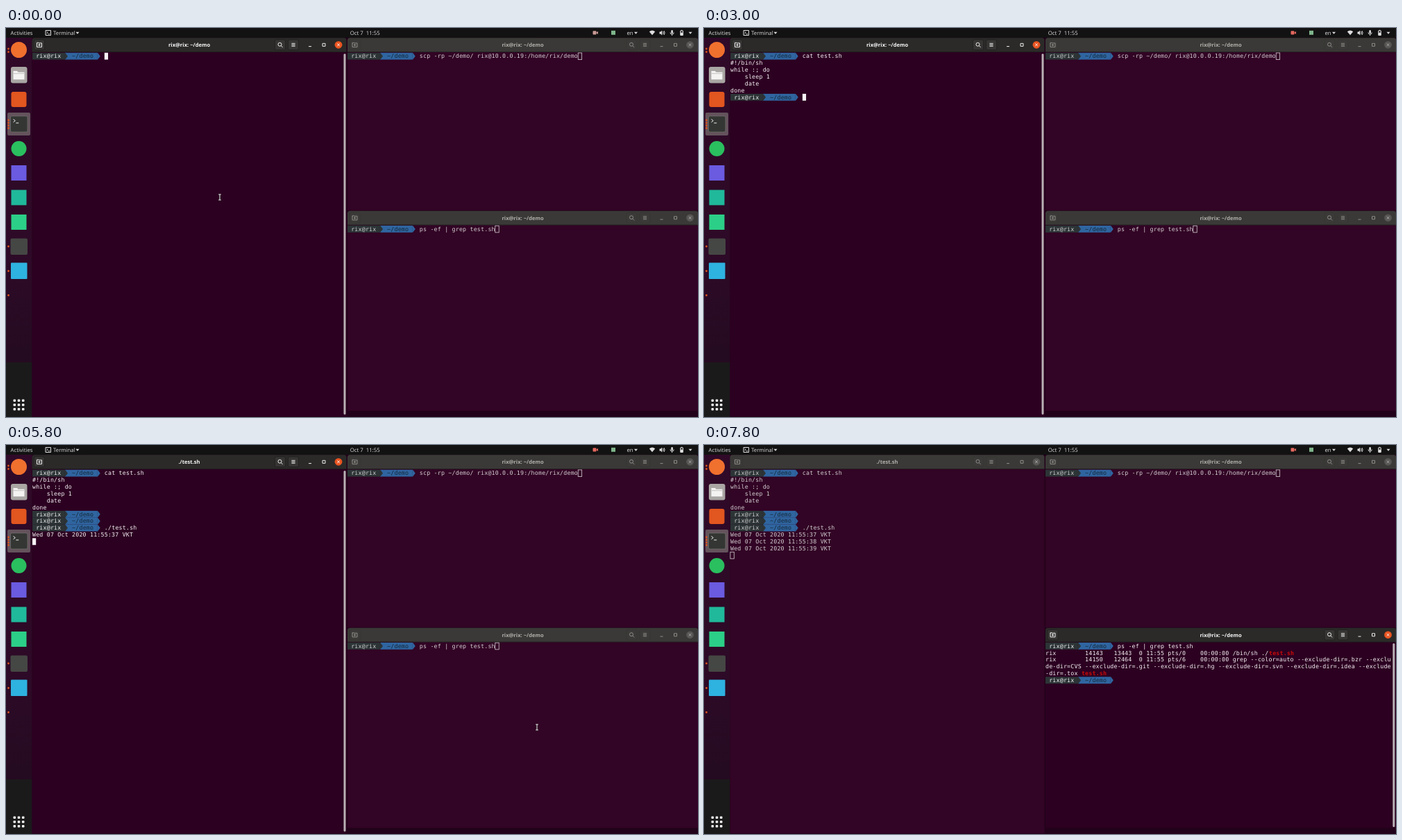
Animation, 997 px wide and 561 px high, one loop 8000 ms. Source, as an HTML page:

```html
<!DOCTYPE html>
<html lang="en">
<head>
<meta charset="utf-8">
<title>Terminal demo</title>
<style>
  html, body { margin: 0; height: 100%; overflow: hidden; background: #111; }
  svg { display: block; width: 100vw; height: 100vh; }
  text { white-space: pre; text-rendering: geometricPrecision; }
  .mono { font: 8.31px "DejaVu Sans Mono", monospace; letter-spacing: .19px; }
  .red { font-weight: bold; }
  .ui { font: 7.8px "Open Sans", "Noto Sans", sans-serif; fill: #dedede; }
  .title { font: bold 7.6px "Open Sans", "Noto Sans", sans-serif; text-anchor: middle; }
  .line { fill: none; stroke-width: 1; }
</style>
</head>
<body>
<svg viewBox="0 0 997 561" preserveAspectRatio="none">
  <defs>
    <linearGradient id="dockFill" x2="0" y2="1">
      <stop offset="0" stop-color="#300a28"/>
      <stop offset=".6" stop-color="#2d0a27"/>
      <stop offset=".855" stop-color="#240b21"/>
      <stop offset=".857" stop-color="#1a1a1a"/>
    </linearGradient>
  </defs>
  <g id="shell"></g>
  <g id="windows"></g>
</svg>
<script>
const LOOP = 8000, CELL = 5.193, ROW = 9.866;
const USER = 'rix', HOST = `${USER}@${USER}`, HOME_TITLE = `${HOST}: ~/demo`;
const LEFT = { x: 37.5, y: 14, right: 490.5, bottom: 560, col: 38, top: 35.7 };
const UPPER = { x: 492, y: 14, right: 997, bottom: 263, col: 492, top: 35.7 };
const LOWER = { x: 492, y: 263.5, right: 997, bottom: 552, col: 492, top: 285 };

const box = (x, y, w, h, fill, r = 0, more = '') =>
  `<rect x="${x}" y="${y}" width="${w}" height="${h}" rx="${r}" fill="${fill}" ${more}/>`;
const dot = (x, y, r, fill) => `<circle cx="${x}" cy="${y}" r="${r}" fill="${fill}"/>`;
const shape = (d, fill) => `<path d="${d}" fill="${fill}"/>`;
const line = (d, stroke, w = 1) => `<path class="line" d="${d}" stroke="${stroke}" stroke-width="${w}"/>`;
const label = (x, y, s, cls = 'ui', more = '') => `<text x="${x}" y="${y}" class="${cls}" ${more}>${s}</text>`;
const caret = x => shape(`M${x - 2.5} 5.8h5l-2.5 3z`, '#dedede');

// Blend two [r, g, b] colours
const mix = (a, b, k) => `rgb(${a.map((v, i) => Math.round(v + (b[i] - v) * k))})`;

function topBar() {
  const ink = '#dedede';
  return box(0, 0, 997, 14, '#121212') +
    label(6.5, 9.7, 'Activities') +
    line('M57 3.5h7.5v7H57zM58.7 5.3l1.5 1.4-1.5 1.4M61 8.7h2', ink, .8) +
    label(68, 9.7, 'Terminal') + caret(103) +
    label(517.2, 9.7, 'Oct 7&#8194;11:55', 'ui', 'text-anchor="middle"') +
    box(872, 3.8, 6, 6, '#7fb58b') +
    label(894.5, 9.7, 'en') + caret(907.5) +
    shape('M926.8 5.3q4.2-3.4 8.4 0l-4.2 5z', ink) +
    shape('M941.5 5.5h1.7l2-2v7l-2-2h-1.7z', ink) + line('M946.5 5q1.5 2 0 4M948 4q2.3 3 0 6', ink, .7) +
    box(958.3, 3, 2.6, 5, ink, 1.3) + line('M957 6.5q0 2.6 2.6 2.6t2.6-2.6M959.6 9v2', ink, .7) +
    line('M971.7 4h3.6v6.5h-3.6z', ink, .8) + box(972.6, 2.8, 1.8, 1, ink) + box(972, 6.5, 3, 4, ink) +
    caret(986);
}

function dock() {
  let s = box(0, 14, 37.5, 547, 'url(#dockFill)');
  s += box(2, 122, 33, 33, '#64525c', 2);
  s += dot(18.5, 31.5, 11.5, '#f0702e');
  s += box(7, 56, 23.5, 23.5, '#a9a6a4', 3) +
    shape('M10.5 62h5.5l1.5 1.7h9v10.5h-16z', '#f4f3f2') + line('M11 65.7h15', '#c4c2c0', .7);
  s += box(7.5, 92, 22, 22, '#e2561f', 3);
  s += box(6.5, 127, 24.5, 23, '#343634', 2, 'stroke="#6f6f6b" stroke-width=".8"') +
    line('M10.5 131.5l2.8 2.2-2.8 2.2M14.3 137h4', '#eee', 1);
  s += dot(18.5, 174, 11, '#2abf5f');
  s += box(7.5, 198, 22, 22, '#6a5be0');
  s += box(7.5, 233.5, 22, 22, '#20b99b');
  s += box(7.5, 269, 22, 22, '#2ccf87');
  s += box(6.5, 303.5, 24.5, 23.5, '#454744', 2);
  s += box(7, 338.5, 23.5, 23.5, '#2eb2e0', 1);
  for (let i = 0; i < 9; i++) s += box(10.5 + i % 3 * 6.2, 535.5 + Math.floor(i / 3) * 6.2, 3.6, 3.6, '#eeeeee', 1);
  for (const y of [30, 34.5, 133, 136.8, 140.6, 144.4, 315, 350.5, 385.5]) s += dot(3.5, y, 1.4, '#d9531e');
  return s;
}

// Window frame; k is the focus amount, 0 to 1
function frame(win, title, k) {
  const { x, y, right, bottom } = win, mid = y + 10.3, w = right - x;
  const ink = mix([142, 140, 136], [240, 240, 240], k);
  const titleInk = mix([176, 174, 170], [245, 245, 245], k);
  const head = mix([58, 57, 55], [43, 42, 41], k);
  const body = mix([50, 4, 37], [44, 0, 33], k);
  const edge = mix([54, 53, 51], [31, 30, 29], k);
  const face = mix([59, 58, 56], [54, 53, 52], k);
  const at = n => right + .5 - n;
  let s = box(x, y + 14, w, bottom - y - 14, body);
  s += shape(`M${x} ${y + 20.7}v-17q0-3.5 3.5-3.5H${right - 3.5}q3.5 0 3.5 3.5v17z`, head);
  s += box(x, y + 20.2, w, .7, '#1d1a1b');
  for (const cx of [x + 10.5, at(96), at(77)])
    s += box(cx - 7.5, mid - 7.3, 15, 14.6, face, 2, `stroke="${edge}" stroke-width=".7"`);
  const n = x + 10.5;
  s += line(`M${n - 3.5} ${mid - 1.8}v-1.2h2.5M${n - 3.5} ${mid - 2.5}v5.6h7v-5.6h-4.5M${n} ${mid - 1.5}v3.4M${n - 1.7} ${mid + .2}h3.4`, ink, .9);
  s += `<circle class="line" cx="${at(96.5)}" cy="${mid - .6}" r="2.5" stroke="${ink}"/>` +
    line(`M${at(94.7)} ${mid + 1.3}l2.3 2.3`, ink, 1.2);
  s += line([-2, 0, 2].map(d => `M${at(79.6)} ${mid + d}h5.2`).join(''), ink, .9);
  s += line(`M${at(55)} ${mid + 2.3}h4`, ink, .9);
  s += line(`M${at(35)} ${mid - 2}h4v4h-4z`, ink, .9);
  s += dot(at(12), mid, 5.4, mix([88, 86, 84], [233, 84, 32], k)) +
    line(`M${at(13.8)} ${mid - 1.8}l3.6 3.6m0-3.6l-3.6 3.6`, titleInk, .9);
  s += label((x + right) / 2, mid + 2.7, title, 'title', `fill="${titleInk}"`);
  return s;
}

const scrollbar = (x, y, h, k) => box(x, y, 3, h, '#b9b1b5', 1.5, `opacity="${k}"`);

// Drawing helpers on the character grid of one window
function grid(win, k) {
  const ink = mix([211, 207, 208], [245, 242, 243], k);
  const px = c => win.col + c * CELL, py = r => win.top + r * ROW;
  const put = (c, r, s, cls = '', fill = ink) => label(px(c), py(r) + 7.7, s, `mono ${cls}`, `fill="${fill}"`);
  const arrow = (c, r, fill) => shape(`M${px(c) - .2} ${py(r)}h.8l3.7 ${ROW / 2}-3.7 ${ROW / 2}h-.8z`, fill);
  return {
    put,
    prompt: (r, cmd = '') =>
      box(px(9), py(r), 9 * CELL, ROW, '#2f65a0') + box(px(0), py(r), 9 * CELL, ROW, '#2c3436') +
      arrow(9, r, '#2c3436') + arrow(18, r, '#2f65a0') +
      put(1, r, HOST) + put(11, r, '~/demo', '', '#162838') + put(20, r, cmd),
    cursor: (c, r, solid) => solid
      ? box(px(c), py(r), CELL, ROW, '#f7f5f6')
      : box(px(c) - .1, py(r) + .2, CELL + .2, ROW - .2, 'none', 0, 'stroke="#d6d0d3" stroke-width=".8"')
  };
}

const KEYS = [[0, ''], [100, 'c'], [300, 'ca'], [800, 'cat'], [1000, 'cat '], [2100, 'cat te'],
  [2300, 'cat tes'], [2600, 'cat test.sh ']];
const SCRIPT = ['#!/bin/sh', 'while :; do', '    sleep 1', '    date', 'done'];

function leftPane(t, k) {
  const g = grid(LEFT, k), running = t >= 4600;
  const first = KEYS.filter(e => e[0] <= t).pop()[1];
  const second = t >= 4300 ? './test.sh ' : './tes'.slice(0, Math.max(0, (t - 3600) / 100));
  let s = frame(LEFT, running ? './test.sh' : HOME_TITLE, k) + scrollbar(486.5, 37, 520.5, k);
  let col = 20 + first.length, row = 0;
  s += g.prompt(0, first);
  if (t >= 3000) {
    SCRIPT.forEach((l, i) => s += g.put(0, i + 1, l));
    row = 6 + (t >= 3400) + (t >= 3500);
    for (let r = 6; r <= row; r++) s += g.prompt(r, r === 8 ? second : '');
    col = 20 + second.length;
  }
  if (running) {
    const ticks = Math.max(0, Math.floor((t - 4600) / 1000));
    for (let i = 0; i < ticks; i++) s += g.put(0, 9 + i, `Wed 07 Oct 2020 11:55:${37 + i} VKT`);
    col = 0;
    row = 9 + ticks;
  }
  const hidden = t >= 1500 && t < 2000 || t >= 5200 && t < 5600;
  return hidden ? s : s + g.cursor(col, row, t < 6000);
}

function upperPane() {
  const g = grid(UPPER, 0), cmd = `scp -rp ~/demo/ ${USER}@10.0.0.19:/home/${USER}/demo`;
  return frame(UPPER, HOME_TITLE, 0) + g.prompt(0, cmd) + g.cursor(20 + cmd.length, 0, false);
}

function lowerPane(t, k) {
  const g = grid(LOWER, k), cmd = 'ps -ef | grep test.sh';
  let s = frame(LOWER, HOME_TITLE, k) + scrollbar(992.3, 286, 265, k) + g.prompt(0, cmd);
  if (t < 6600) s += g.cursor(20 + cmd.length, 0, t >= 6000);
  if (t >= 7200) {
    const skip = d => `--exclude-dir=${d}`;
    const proc = (pid, parent, tty, run) =>
      `${USER}        ${pid}   ${parent}  0 11:55 pts/${tty}    00:00:00 ${run}`;
    const grep = proc(14150, 12464, 6, 'grep --color=auto ' +
      ['.bzr', 'CVS', '.git', '.hg', '.svn', '.idea', '.tox'].map(skip).join(' '));
    const match = (c, r) => g.put(c, r, 'test.sh', 'red', '#c80a0a');
    s += g.put(0, 1, proc(14143, 13443, 0, '/bin/sh ./')) + match(62, 1);
    for (let i = 0; i < 3; i++) s += g.put(0, 2 + i, grep.slice(i * 96, i * 96 + 96));
    s += match(10, 4) + g.prompt(5);
    if (t < 7800) s += g.cursor(20, 5, true);
  }
  return s;
}

function pointer(t) {
  if (t >= 100 && t < 5500 || t >= 7200) return '';
  const u = t < 100 ? 0 : Math.min(1, (t - 5400) / 400), e = u * u * (3 - 2 * u);
  const d = `M${308 + 457 * e - 1.8} ${244 + 163 * e - 4}h3.6m-1.8 0v8m-1.8 0h3.6`;
  return line(d, '#111', 2.4) + line(d, '#f2f2f2', 1.1);
}

function recorder(t) {
  const fill = t < 200 ? '#c99a95' : '#e4685e';
  return box(845.5, 4.3, 5, 5.2, fill, .8) + shape('M850.5 6.5l2.5-1.7v4.2l-2.5-1.7z', fill);
}

function scene(t) {
  const u = Math.min(1, Math.max(0, (t - 5900) / 500)), k = u * (2 - u);
  return recorder(t) + leftPane(t, 1 - k) + upperPane() + lowerPane(t, k) + pointer(t);
}

const windows = document.getElementById('windows');
document.getElementById('shell').innerHTML = box(0, 0, 997, 561, '#22021a') + dock() + topBar();
let shown = -1;
function tick() {
  const t = Math.floor(performance.now() % LOOP / 100) * 100;
  if (t !== shown) windows.innerHTML = scene(shown = t);
  requestAnimationFrame(tick);
}
tick();
</script>
</body>
</html>
```
